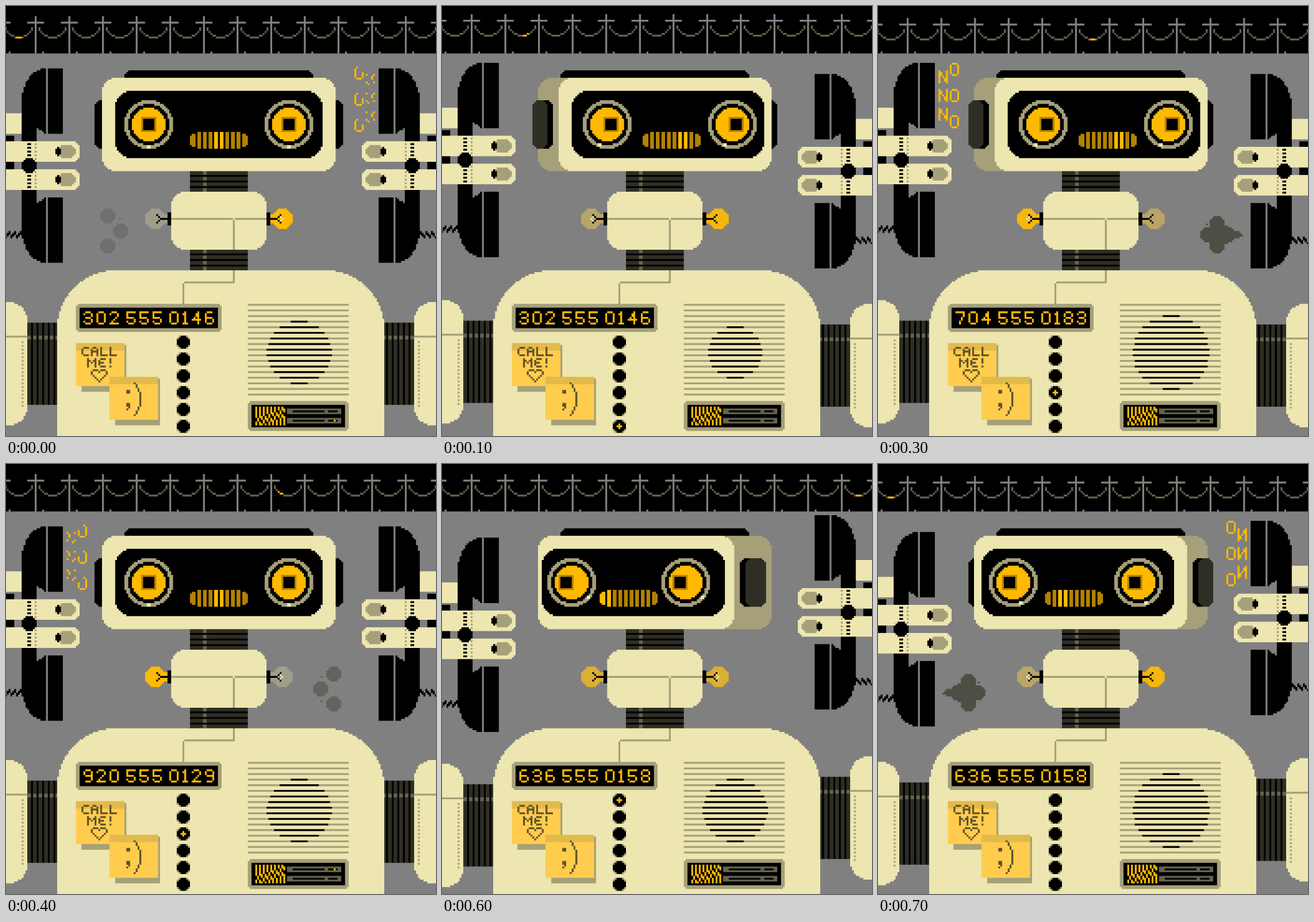
An HTML page with a canvas that plays this animation: 748 by 748 pixels, repeating every 800 ms.

```html
<!DOCTYPE html>
<html lang="en">
<head>
<meta charset="utf-8">
<title>Robot operator</title>
<style>
  html, body { margin: 0; width: 100%; height: 100%; overflow: hidden; background: #808080; }
  #stage { position: fixed; inset: 0; overflow: hidden; }
  canvas { position: absolute; left: -1.752px; top: -1.752px; width: 751.212px; height: 751.212px; }
</style>
</head>
<body>
<div id="stage"><canvas id="art" width="924" height="924" role="img" aria-label="A robot on two telephones; a note reads CALL ME!"></canvas></div>
<script>
// One art pixel is 4 canvas pixels; the page scales the canvas down with soft edges.
const ctx = document.getElementById('art').getContext('2d');
ctx.scale(4, 4);
ctx.translate(1, 1);

const BLACK = '#000', GRAY = '#808080', CREAM = '#ede6b0', TAN = '#a6a07a', GOLD = '#ffb900',
  AMBER = '#b38200', DARK = '#2e2e24', OLIVE = '#65634d', INK = '#62522a';
const NUMBERS = ['302 555 0146', '704 555 0183', '920 555 0129', '636 555 0158'];

// Glyphs are strokes through grid points, written as xy pairs.
const DIGITS = {
  0: '10 30 41 45 36 16 05 01 10',
  1: '01 10 16,06 26',
  2: '01 10 30 41 42 06 46',
  3: '01 10 30 41 42 33 13,33 44 45 36 16 05',
  4: '30 04 44,30 36',
  5: '40 00 03 33 44 45 36 16 05',
  6: '30 10 01 05 16 36 45 44 33 03',
  7: '00 40 41 26',
  8: '10 30 41 42 33 13 02 01 10,13 04 05 16 36 45 44 33',
  9: '43 13 02 01 10 30 41 45 36 16'
};
const SMALL = {
  C: '30 10 01 03 14 34', A: '04 01 10 20 31 34,02 32', L: '00 04 34',
  M: '04 00 22 40 44', E: '30 10 01 03 14 34,02 22', '!': '10 12,14 14'
};
const TALL = { N: '06 00 46 40', O: '10 30 41 45 36 16 05 01 10' };

function box(x0, y0, x1, y1, color) {
  if (color) ctx.fillStyle = color;
  ctx.fillRect(x0, y0, x1 - x0, y1 - y0);
}

function round(x0, y0, x1, y1, r, color) {
  ctx.fillStyle = color;
  for (let y = y0; y < y1; y++) {
    const d = Math.min(y - y0, y1 - 1 - y);
    const inset = d < r ? Math.round(r - Math.sqrt(r * r - (r - d - 0.5) ** 2)) : 0;
    box(x0 + inset, y, x1 - inset, y + 1);
  }
}

const disc = (x, y, r, color) => round(x - r, y - r, x + r, y + r, r, color);

function line(points, color, x = 0, y = 0, keep = () => true) {
  ctx.fillStyle = color;
  points.forEach((p, i) => {
    const q = points[Math.max(0, i - 1)];
    const n = Math.max(Math.abs(p[0] - q[0]), Math.abs(p[1] - q[1]), 1);
    for (let k = 0; k <= n; k++) {
      const px = Math.round(q[0] + (p[0] - q[0]) * k / n);
      const py = Math.round(q[1] + (p[1] - q[1]) * k / n);
      if (keep(px, py)) box(x + px, y + py, x + px + 1, y + py + 1);
    }
  });
}

function text(str, x, y, font, color, gap = 1, keep) {
  for (const ch of str) {
    if (ch === ' ') { x += 2; continue; }
    const strokes = font[ch].split(',').map(s => s.split(' ').map(p => [+p[0], +p[1]]));
    strokes.forEach(s => line(s, color, x, y, keep));
    x += Math.max(...strokes.flat().map(p => p[0])) + 1 + gap;
  }
}

// Runs draw, mirrored so that x becomes sum - x when on is true.
function flip(sum, on, draw) {
  ctx.save();
  if (on) { ctx.translate(sum, 0); ctx.scale(-1, 1); }
  draw();
  ctx.restore();
}

function shifted(dy, draw) {
  ctx.save();
  ctx.translate(0, dy);
  draw();
  ctx.restore();
}

const wireY = d => 16 - Math.round(d * d / 16 + d ** 6 / 60000);

function sky(step, bob) {
  box(-1, -1, 230, 25, BLACK);
  const spark = [6, 44, 82, 114, 146, 184, 222, 6][step];
  for (let k = -1; k < 13; k++) {
    const x = 15 + 18 * k;
    box(x, 5 + bob, x + 1, 25, GRAY);
    box(x - 4, 8 + bob, x + 5, 9 + bob);
    box(x + 4, 24, x + 5, 25);
    for (let d = -7; d <= 7; d++) {
      const wx = x - 9 + d, y = wireY(d) + bob;
      const end = Math.max(y + 1, wireY(Math.abs(d) - 1) + bob);
      box(wx, y, wx + 1, end, Math.abs(wx - spark) < 2 ? GOLD : OLIVE);
    }
  }
}

function phone() {
  const cord = Array.from({ length: 7 }, (_, i) => [i * 1.5 - 1, i % 2 ? 120 : 123]);
  line(cord, BLACK);
  const row = (y, a, b) => { box(a, y, b, y + 1); box(a, 169 - y, b, 170 - y); };
  ctx.fillStyle = BLACK;
  for (let y = 33; y < 85; y++) {
    const v = Math.max(0, (50.5 - y) / 18);
    const left = 21 - Math.round(13 * Math.sqrt(1 - v * v));
    row(y, left, y < 65 ? 21 : 16);
    if (y > 64 && y < 68) row(y, 16 + Math.round((y - 64) * 1.25), 21);
  }
  round(22, 33, 30, 68, 1, BLACK);
  round(22, 102, 30, 137, 1, BLACK);
  box(-1, 57, 8, 68, CREAM);
  box(-1, 69, 4, 72, BLACK);
  box(-1, 83, 4, 87);
  for (const y of [72, 87]) {
    round(-20, y, 39, y + 11, 4, CREAM);
    for (let k = 1; k < 11; k += 2) {
      box(11, y + k, 13, y + k + 1, BLACK);
      box(15, y + k, 16, y + k + 1, TAN);
    }
    round(27, y + 2, 37, y + 9, 3.5, TAN);
    round(26, y + 3, 29, y + 8, 2, BLACK);
  }
  disc(12, 85, 4, BLACK);
}

function arm() {
  box(11, 169, 28, 213, BLACK);
  for (let x = 11; x < 28; x += 3) {
    box(x, 169, x + 2, 213, DARK);
    box(x, 176, x + 2, 178, OLIVE);
  }
  round(-20, 158, 11, 224, 10, CREAM);
  box(-1, 176, 11, 177, TAN);
  for (let y = 179; y < 215; y += 2) box(8, y, 9, y + 1);
}

// age 0: fresh shout, age 1: dissolving
function shout(age) {
  const keepN = age ? (x, y) => (x * 2 + y * 3) % 4 < 2 && y !== 3 : undefined;
  const keepO = age ? (x, y) => x > 2 || y > 2 : undefined;
  [[34, 30], [44, 44], [54, 58]].forEach(([n, o]) => {
    text('N', 32, n + age * 2, TALL, GOLD, 1, keepN);
    text('O', 38, o + age * 2, TALL, GOLD, 1, keepO);
  });
}

function puff(age, color) {
  if (age) {
    [[175, 112], [168, 120], [175, 128]].forEach(([x, y]) => disc(x, y, 4, color));
    box(168, 113, 169, 114);
    box(168, 126, 169, 127);
    return;
  }
  [[181, 116], [181, 128], [176, 122]].forEach(([x, y]) => disc(x, y, 4, color));
  box(177, 117, 185, 127);
  for (let x = 181; x < 195; x++) {
    const h = Math.round(7 * (1 - (x - 181) / 14));
    box(x, 122 - h, x + 1, 122 + Math.max(h, 1));
  }
  box(175, 116, 176, 117);
}

function head(yaw) {
  const a = Math.abs(yaw);
  round(63, 34, 164, 42, 4, BLACK);
  flip(227, yaw < 0, () => {
    if (a === 0) round(47, 50, 60, 76, 4, BLACK);
    if (a < 2) round(160, 50, 180 - a, 76, 4, BLACK);
    round(51, 38, 176, 88, 8, TAN);
    round([51, 62, 71][a], 38, 176, 88, 8, CREAM);
    if (a) {
      const [l, m, r] = a === 1 ? [48, 56, 59] : [54, 65, 68];
      round(l, 50, r, 76, 4, BLACK);
      round(l, 50, m, 76, 4, DARK);
    }
    round([58, 69, 76][a], 45, [169, 172, 174][a], 81, 9, BLACK);

    const look = [0, 2, 3][a];
    for (const x of [[76, 151], [88, 155], [97, 158]][a]) {
      disc(x, 63, 13, TAN);
      disc(x, 63, 11, BLACK);
      disc(x, 63, 9, GOLD);
      box(x + look - 4, 59, x + look + 4, 67, AMBER);
      box(x + look - 3, 60, x + look + 3, 66, BLACK);
      const [gx, gy] = [[-1, 74], [-5, 73], [-10, 70]][a];
      box(x + gx, gy, x + gx + 2, gy + 2, CREAM);
    }

    const m = [98, 107, 112][a], lit = [4, 6, 8][a];
    for (let i = 0; i < 10; i++) {
      const end = i === 0 || i === 9;
      const x = m + (i ? 1 + i * 3 : 0);
      const color = i === lit || i === lit + 1 ? GOLD : AMBER;
      box(x, end ? 68 : 67, x + (end ? 3 : 2), end ? 75 : 76, color);
      if (end) {
        const edge = i ? x + 2 : x;
        box(edge, 68, edge + 1, 69, BLACK);
        box(edge, 74, edge + 1, 75);
      }
    }
  });
}

function neck(y) {
  box(98, y, 129, y + 11, BLACK);
  for (let k = 0; k < 11; k++) {
    if (k % 3 === 2) continue;
    box(98, y + k, 129, y + k + 1, DARK);
    box(105, y + k, 107, y + k + 1, OLIVE);
  }
}

function bulb(step, glint) {
  const level = (0.5 + 0.5 * Math.cos(step * Math.PI / 4)) ** 0.7;
  const mix = (p, q) => Math.round(p + (q - p) * level);
  const color = `rgb(${mix(160, 255)},${mix(158, 185)},${mix(139, 0)})`;
  round(74, 108, 85, 119, 5.5, color);
  box(83, 111, 86, 116);
  box(86, 110, 88, 117, BLACK);
  line([[86, 113], [82, 113], [80, 111]], BLACK);
  line([[82, 113], [80, 115]], BLACK);
  if (glint) line([[80, 112], [79, 113], [80, 114]], CREAM);
}

function collar(step) {
  neck(88);
  neck(130);
  flip(227, false, () => bulb(step + 4, step % 2 === 1));
  flip(227, true, () => bulb(step, step % 2 === 0));
  round(88, 99, 139, 130, 8, CREAM);
  box(88, 113, 121, 114, TAN);
  box(122, 113, 139, 114);
  box(121, 114, 122, 130);
}

function note(x, y) {
  box(x + 3, y + 1, x + 27, y + 26, TAN);
  box(x, y, x + 26, y + 23, '#ffcc4d');
  box(x, y, x + 26, y + 4, '#e2ba4c');
}

function notes() {
  note(37, 180);
  text('CALL', 40, 182, SMALL, INK);
  text('ME!', 43, 188, SMALL, INK);
  line([[4, 1], [3, 0], [1, 0], [0, 1], [0, 2], [4, 6], [8, 2], [8, 1], [7, 0], [5, 0], [4, 1]], INK, 45, 194);
  note(55, 198);
  box(64, 205, 66, 207, INK);
  box(64, 212, 66, 214);
  line([[65, 214], [64, 215]], INK);
  line([[68, 201], [70, 204], [71, 207], [71, 212], [70, 215], [68, 218]], INK);
}

function speaker(r) {
  for (let y = 159; y < 208; y += 3) {
    box(129, y, 183, y + 1, TAN);
    const dy = Math.abs(y - 184.5);
    if (dy < r) {
      const h = Math.round(Math.sqrt(r * r - dy * dy));
      box(156 - h, y, 156 + h + 1, y + 1, BLACK);
    }
  }
}

function deck(step) {
  round(129, 211, 183, 227, 2, TAN);
  round(131, 213, 181, 225, 1, BLACK);
  ctx.fillStyle = GOLD;
  for (let x = 133; x < 149; x++) {
    for (let y = 214; y < 224; y++) {
      const bend = Math.max(0, Math.min(3, Math.floor((y - 213 - (148 - x) / 3) / 2)));
      if ((x - bend) % 2) box(x, y, x + 1, y + 1);
    }
  }
  for (const y of [215, 220]) {
    box(150, y, 179, y + 3, OLIVE);
    box(153, y + 1, 170, y + 2, BLACK);
    box(172, y + 1, 177, y + 2);
  }
  const led = { 0: 221, 4: 216 }[step];
  if (led) box(175, led, 176, led + 1, GOLD);
}

function body(step, bob) {
  round(27, 141, 202, 300, 31.5, CREAM);
  box(121, 141, 122, 147, TAN);
  box(95, 147, 122, 148);
  box(94, 148, 95, 160);
  round(37, 159, 115, 174, 2, TAN);
  round(39, 161, 113, 172, 1, BLACK);
  text(NUMBERS[step >> 1], 41, 163, DIGITS, GOLD, 2);
  for (let i = 0; i < 6; i++) {
    const y = 176 + 9 * i;
    round(91, y, 98, y + 7, 3, TAN);
    round(91, y, 98, y + 7, 3.5, BLACK);
    if (i === 6 - step) {
      box(93, y + 3, 96, y + 4, GOLD);
      box(94, y + 2, 95, y + 5);
    }
  }
  notes();
  speaker(17 + 3 * bob);
  deck(step);
}

function draw(step) {
  const yaw = [0, 1, 2, 1, 0, -1, -2, -1][step];
  const bob = [0, -1, 0, 1][step % 4];
  box(-1, -1, 230, 230, GRAY);
  sky(step, bob);
  for (const right of [false, true]) {
    const lift = right ? yaw : -yaw;
    flip(229, right, () => {
      shifted(lift * 3, phone);
      shifted(lift, arm);
    });
  }
  // Left shouts and right puffs in the first half, swapped in the second.
  const age = (step + 1) % 4;
  if (age < 2) {
    const swap = step === 7 || step === 0;
    flip(229, swap, () => {
      shout(age);
      puff(age, age ? (swap ? '#6f6f6d' : '#63635d') : '#4f4e45');
    });
  }
  head(yaw);
  collar(step);
  body(step, bob);
}

let shown = -1;
function tick(now) {
  const step = Math.floor(now / 100) % 8;
  if (step !== shown) draw(shown = step);
  requestAnimationFrame(tick);
}
draw(0);
requestAnimationFrame(tick);
</script>
</body>
</html>
```
